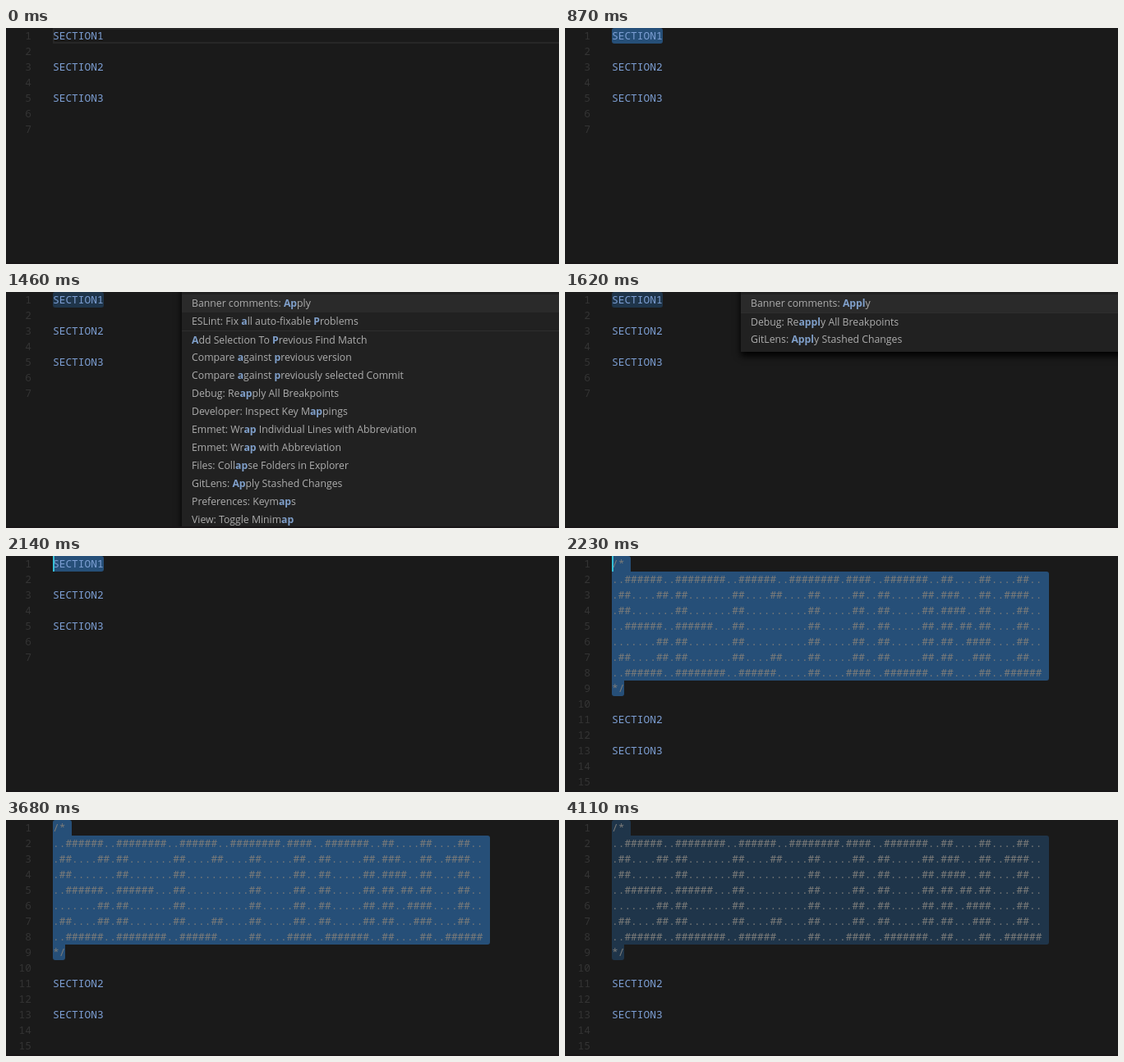
Recreate the animation shown at these times as an HTML page. Size 673 by 288 pixels, loop 4140 ms.

```html
<!DOCTYPE html>
<html lang="en">
<head>
<meta charset="utf-8">
<title>Banner comment</title>
<style>
html, body { margin: 0; width: 100%; height: 100%; overflow: hidden; background: #1a1a1a; }
#stage { position: relative; width: 673px; height: 288px; overflow: hidden; background: #1a1a1a; }
#stage div { position: absolute; box-sizing: border-box; white-space: pre; }
.code { top: 0; font: 12.83px/19px "Noto Sans Mono", "DejaVu Sans Mono", monospace; font-variant-ligatures: none; }
#numbers { left: 0; width: 31px; text-align: right; color: #343434; }
#text { left: 57px; color: #7d9fd4; }
#text .comment { color: #7b7b79; }
#line { left: 57px; top: 0; width: 630px; height: 19px; border: 2px solid #272727; }
#cursor { left: 57px; top: 0; width: 2px; height: 19px; background: #35bfd6; }
.sel { left: 57px; background: #264f78; }
.dim .sel { background: #1f354a; }
#panel { left: 214px; top: -40px; width: 480px; background: #212121; box-shadow: 0 5px 8px #000; }
.row { left: 0; width: 100%; height: 22px; padding-left: 12px; color: #adadad;
  font: 12.25px/22px "Open Sans", "Noto Sans", sans-serif; }
.row:first-child { background: #2a2a2a; }
.row.rule { border-top: 1px solid #2e2e2e; }
.row b { color: #7f9fca; font-weight: 700; }
#edge { left: 0; top: 286px; width: 673px; height: 2px; background: #181517; }
</style>
</head>
<body>
<div id="stage">
  <div id="line"></div>
  <div id="sels"></div>
  <div id="numbers" class="code"></div>
  <div id="text" class="code"></div>
  <div id="cursor"></div>
  <div id="panel"></div>
  <div id="edge"></div>
</div>
<script>
const LOOP = 4140;
const ROW = 22, LIST_TOP = 43;
const $ = id => document.getElementById(id);

const banner = `/*
..######..########..######..########.####..#######..##....##....##..
.##....##.##.......##....##....##.....##..##.....##.###...##..####..
.##.......##.......##..........##.....##..##.....##.####..##....##..
..######..######...##..........##.....##..##.....##.##.##.##....##..
.......##.##.......##..........##.....##..##.....##.##..####....##..
.##....##.##.......##....##....##.....##..##.....##.##...###....##..
..######..########..######.....##....####..#######..##....##..######
*/`;
const rest = "\n\nSECTION2\n\nSECTION3\n\n";
const docs = {
  plain: { html: "SECTION1" + rest, lines: 7, sel: [[0, 19, 62, "3px"]] },
  banner: {
    html: `<span class="comment">${banner}</span>${rest}`, lines: 15,
    sel: [[0, 19, 23, "3px 3px 0 0"], [19, 133, 532, "0 3px 3px 0"], [152, 19, 15, "0 0 3px 3px"]]
  }
};

// Square brackets mark the matched letters; "rules" is the row under the separator.
const lists = {
  all: { rule: 2, rows: ["Banner comments: Apply", "ESLint: Fix all auto-fixable Problems",
    "Add Cursor Above", "Add Cursor Below", "Add Cursors to Line Ends", "Add Line Comment",
    "Add Selection To Next Find Match", "Add Selection To Previous Find Match",
    "Change All Occurrences", "Change End of Line Sequence", "Change File Encoding",
    "Change Language Mode", "Clear Editor History"] },
  a: { rule: 2, rows: ["B[a]nner comments: Apply", "ESLint: Fix [a]ll auto-fixable Problems",
    "[A]dd Cursor Above", "[A]dd Cursor Below", "[A]dd Cursors to Line Ends", "[A]dd Line Comment",
    "[A]dd Selection To Next Find Match", "[A]dd Selection To Previous Find Match",
    "Ch[a]nge All Occurrences", "Ch[a]nge End of Line Sequence", "Ch[a]nge File Encoding",
    "Ch[a]nge Language Mode", "Cle[a]r Editor History"] },
  ap: { rule: 2, rows: ["Banner comments: [Ap]ply", "ESLint: Fix [a]ll auto-fixable [P]roblems",
    "[A]dd Selection To [P]revious Find Match", "Compare [a]gainst [p]revious version",
    "Compare [a]gainst [p]reviously selected Commit", "Debug: Re[ap]ply All Breakpoints",
    "Developer: Inspect Key M[ap]pings", "Emmet: Wr[ap] Individual Lines with Abbreviation",
    "Emmet: Wr[ap] with Abbreviation", "Files: Coll[ap]se Folders in Explorer",
    "GitLens: [Ap]ply Stashed Changes", "Preferences: Keym[ap]s", "View: Toggle Minim[ap]"] },
  app: { rule: 1, rows: ["Banner comments: [App]ly", "Debug: Re[app]ly All Breakpoints",
    "Developer: Inspect Key M[app]ings", "GitLens: [App]ly Stashed Changes"] },
  appl: { rule: 1, rows: ["Banner comments: [Appl]y", "Debug: Re[appl]y All Breakpoints",
    "GitLens: [Appl]y Stashed Changes"] }
};

// Each step overrides the state before it.
const steps = [
  [0, { doc: "plain", sel: "", line: true, cursor: false, list: "" }],
  [340, { sel: "full", cursor: true }],
  [400, { line: false }],
  [870, { cursor: false }],
  [1120, { sel: "dim", list: "all" }],
  [1370, { list: "a" }],
  [1460, { list: "ap" }],
  [1580, { list: "app" }],
  [1620, { list: "appl" }],
  [2140, { sel: "full", cursor: true, list: "" }],
  [2230, { doc: "banner" }],
  [2680, { cursor: false }],
  [3180, { cursor: true }],
  [3680, { cursor: false }],
  [4110, { sel: "dim" }]
];
const states = [];
for (const [, change] of steps) states.push({ ...states[states.length - 1], ...change });

const show = (el, on) => { el.style.display = on ? "block" : "none"; };

function drawList(name) {
  const panel = $("panel"), list = lists[name];
  show(panel, list);
  if (!list) return;
  panel.style.height = LIST_TOP + ROW * list.rows.length + 4 + "px";
  panel.innerHTML = list.rows.map((row, i) => {
    const label = row.replace(/\[(.+?)\]/g, "<b>$1</b>");
    return `<div class="row${i === list.rule ? " rule" : ""}" style="top:${LIST_TOP + ROW * i}px">${label}</div>`;
  }).join("");
}

function draw(state) {
  const doc = docs[state.doc];
  $("text").innerHTML = doc.html;
  $("numbers").textContent = Array.from({ length: doc.lines }, (_, i) => i + 1).join("\n");
  $("sels").className = state.sel;
  $("sels").innerHTML = state.sel && doc.sel.map(([y, h, w, r]) =>
    `<div class="sel" style="top:${y}px;height:${h}px;width:${w}px;border-radius:${r}"></div>`).join("");
  show($("line"), state.line);
  show($("cursor"), state.cursor);
  drawList(state.list);
}

let current = -1;
const start = performance.now();
function tick() {
  const t = (performance.now() - start) % LOOP;
  const index = steps.filter(([at]) => at <= t).length - 1;
  if (index !== current) draw(states[current = index]);
  requestAnimationFrame(tick);
}
tick();
</script>
</body>
</html>
```
